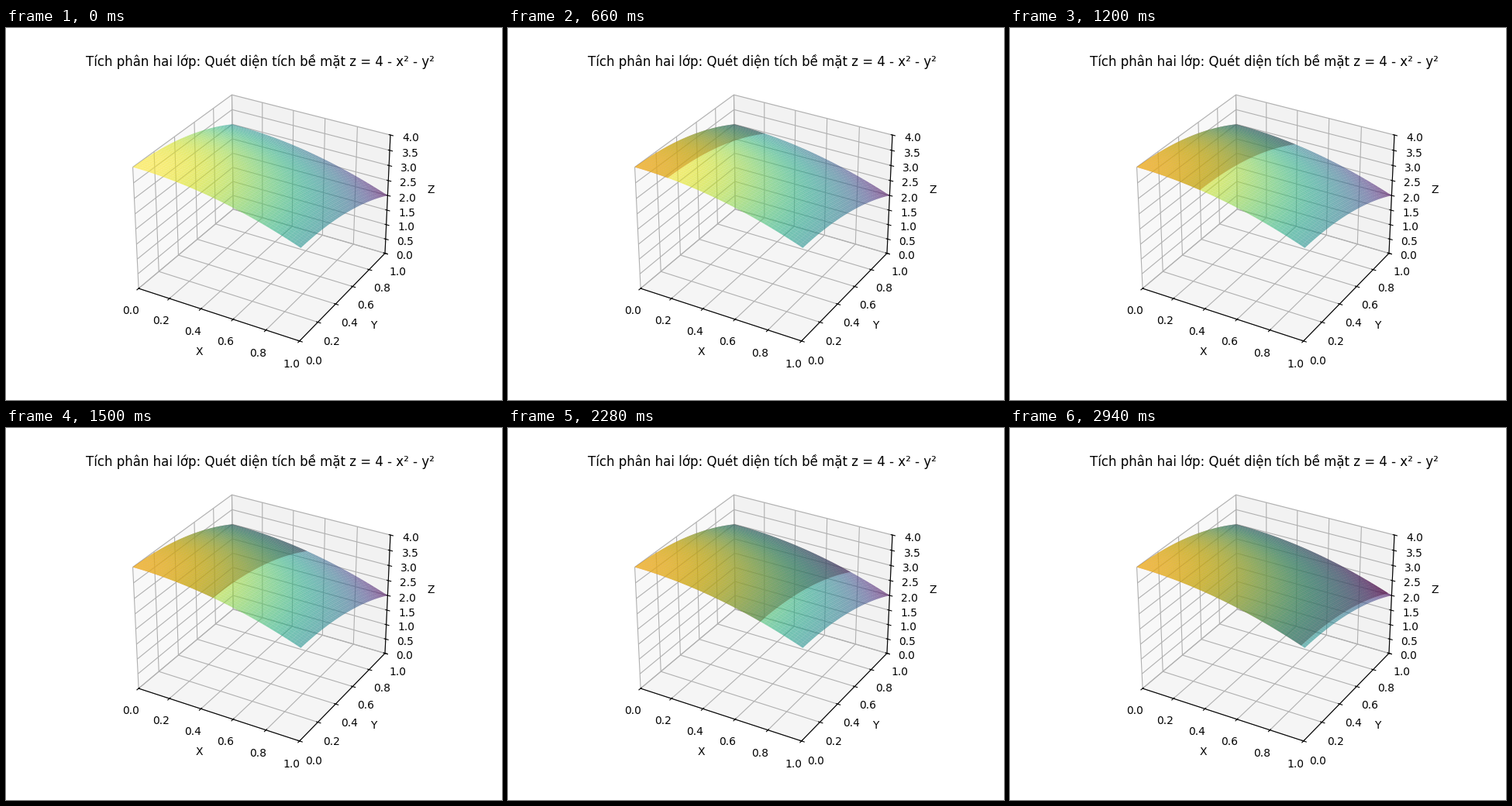
Animation of 640 by 480 pixels, one loop 3000 ms. Source, as a matplotlib script:

```python
import numpy as np
import matplotlib.pyplot as plt
from matplotlib.animation import FuncAnimation

FRAMES = 50
INTERVAL = 60

fig = plt.figure(figsize=(6.4, 4.8), dpi=100)
ax = fig.add_subplot(projection="3d")

axis = np.linspace(0, 1, FRAMES)
X, Y = np.meshgrid(axis, axis)
Z = 4 - X**2 - Y**2

ax.plot_surface(X, Y, Z, cmap="viridis", alpha=0.6)
ax.set(xlim=(0, 1), ylim=(0, 1), zlim=(0, 4),
       xlabel="X", ylabel="Y", zlabel="Z")
ax.set_title("Tích phân hai lớp: Quét diện tích bề mặt z = 4 - x² - y²")

swept = []


def clear():
    while swept:
        swept.pop().remove()
    return []


def update(n):
    """Cover the first n columns of the grid with the swept area."""
    clear()
    if n > 1:
        part = np.s_[:, :n]
        swept.append(ax.plot_surface(X[part], Y[part], Z[part],
                                     color="red", alpha=0.5))
        ax.set(xlim=(0, 1), ylim=(0, 1), zlim=(0, 4))
    return swept


anim = FuncAnimation(fig, update, frames=FRAMES, init_func=clear,
                     interval=INTERVAL, repeat=True, repeat_delay=0,
                     blit=False)
plt.show()
```
